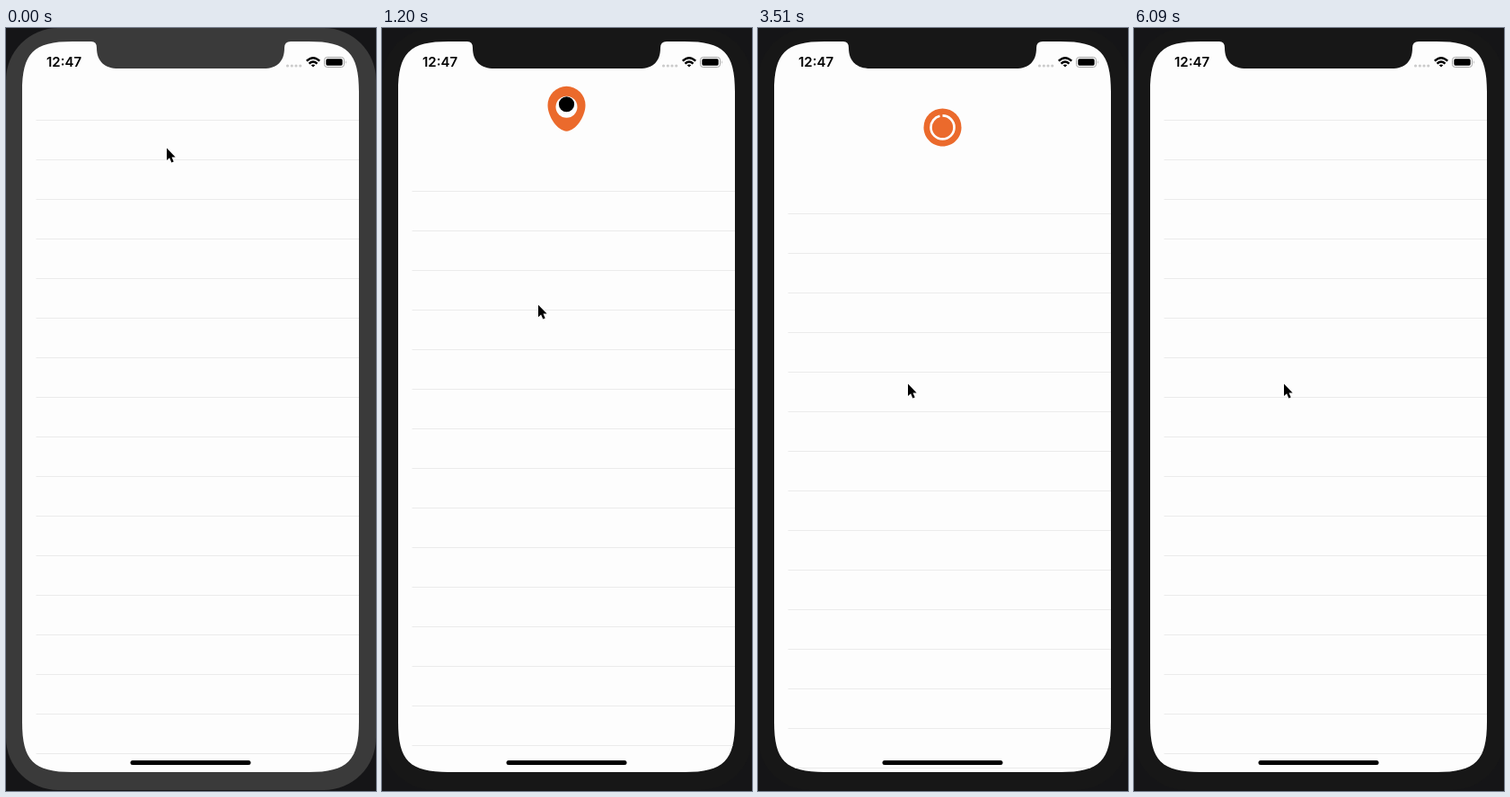
Write an HTML page that moves like this. It is 412 by 848 pixels and loops after 6330 ms.

```html
<!DOCTYPE html>
<html lang="en">
<head>
<meta charset="utf-8">
<title>Pull to refresh</title>
<style>
  html, body { margin: 0; width: 100%; height: 100%; overflow: hidden; background: #151517; }
  svg { display: block; width: 412px; height: 848px; }
  #time { font: 600 15px Inter, "Open Sans", sans-serif; }
  #bezel { fill: #171717; animation: dim 6330ms step-end infinite; }
  @keyframes dim { 0% { fill: #3a3a3a; } 0.95%, 100% { fill: #171717; } }
</style>
</head>
<body>
<svg viewBox="0 0 412 848">
  <defs>
    <clipPath id="screen">
      <path d="M74 15H95Q101 15 101 22C101 37 110 45 125 45H287C302 45 310 37 310 22Q310 15 317 15H337C380.5 15 393 27.5 393 71V771C393 814.5 380.5 827 337 827H74C30.5 827 18 814.5 18 771V71C18 27.5 30.5 15 74 15Z"/>
    </clipPath>
  </defs>
  <rect width="412" height="848" fill="#151517"/>
  <rect id="bezel" width="412" height="847" rx="58"/>

  <g clip-path="url(#screen)">
    <rect width="412" height="848" fill="#fdfdfd"/>
    <path id="lines" fill="none" stroke="#ebebeb"/>
    <g id="pin">
      <path id="drop" fill="#eb6a2c"/>
      <g id="eye">
        <circle id="white" r="12" fill="#fdfdfd"/>
        <circle id="pupil" r="8.6"/>
      </g>
      <circle id="ring" r="13" pathLength="1" transform="rotate(-90)" fill="none" stroke="#fdfdfd" stroke-width="2.7"/>
    </g>
  </g>

  <text id="time" x="45" y="43">12:47</text>
  <g fill="#cbcbcb">
    <circle cx="313.5" cy="42" r="1.6"/><circle cx="318.3" cy="42" r="1.6"/>
    <circle cx="323" cy="42" r="1.6"/><circle cx="327.7" cy="42" r="1.6"/>
  </g>
  <g fill="none" stroke="#000" stroke-width="2.4">
    <path d="M334.8 36.6Q342 29.8 349.2 36.6"/>
    <path d="M337.5 39.6Q342 35.4 346.5 39.6"/>
    <path d="M342 43.6L339.7 41.3Q342 39.6 344.3 41.3Z" fill="#000" stroke="none"/>
  </g>
  <rect x="354.5" y="32.5" width="22" height="11" rx="3" fill="none" stroke="#a4a4a4"/>
  <rect x="356.3" y="34.3" width="18.4" height="7.4" rx="1.6"/>
  <path d="M378 36Q379.6 38 378 40Z" fill="#a4a4a4"/>
  <rect x="138.5" y="814" width="134" height="5" rx="2.5"/>

  <path id="cursor" d="M0 0V13.6L3.1 10.8L5.3 15.9L7.7 14.9L5.5 9.9H9.6Z" stroke="#fdfdfd" stroke-width="1.2" paint-order="stroke"/>
</svg>
<script>
const LOOP = 6330, RELEASE = 2640, SETTLED = 2954, CLOSE = 5560, CLOSED = 5960;
const HOLD = 104, PHASE = 579, R = 21;
const $ = id => document.getElementById(id);
const clamp = v => Math.min(1, Math.max(0, v));
const mix = (a, b, k) => a + (b - a) * k;
const move = (el, x, y) => el.setAttribute("transform", `translate(${x} ${y})`);
const easeOut = k => 1 - (1 - k) ** 3;
const easeInOut = k => k * k * (3 - 2 * k);

// time, cursor x, distance dragged
const drag = [[30, 179, 0], [810, 177, 120], [1200, 174, 174], [1710, 170, 255], [2100, 167, 262]];

function cursorAt(t) {
  let i = 0;
  while (i < drag.length - 2 && t > drag[i + 1][0]) i++;
  const [t0, x0, y0] = drag[i], [t1, x1, y1] = drag[i + 1];
  let k = clamp((t - t0) / (t1 - t0));
  if (i === drag.length - 2) k = easeOut(k);
  return [mix(x0, x1, k), mix(y0, y1, k)];
}

// scroll view resistance
function rubber(y) {
  const height = 812, pull = Math.max(0, y - 14);
  return height * (1 - 1 / (0.55 * pull / height + 1));
}

function offsetAt(t, y) {
  if (t < RELEASE) return rubber(y);
  if (t < CLOSE) return mix(rubber(y), HOLD, easeOut(clamp((t - RELEASE) / (SETTLED - RELEASE))));
  return HOLD * (1 - easeInOut(clamp((t - CLOSE) / (CLOSED - CLOSE))));
}

function drawPin(t, off) {
  const k = t > RELEASE ? 1 : clamp((off - 54) / 46);
  const tip = mix(38.5, R, k), c1 = mix(14, 11.6, k), c2 = mix(8, 11.6, k);
  move($("pin"), 205.5, off + 6.4);
  $("drop").setAttribute("d",
    `M${-R} 0A${R} ${R} 0 0 1 ${R} 0C${R} ${c1} ${c2} ${tip} 0 ${tip}C${-c2} ${tip} ${-R} ${c1} ${-R} 0Z`);
  move($("white"), 0, k * 3.5);
  move($("pupil"), 0, -k * 2);
  $("eye").setAttribute("transform", `scale(${clamp((1 - k) / 0.2)})`);
}

// the arc grows clockwise to a full ring, then is eaten from its start
function drawRing(t) {
  const on = t >= SETTLED && t < CLOSE;
  const p = (t - SETTLED) / PHASE % 2;
  const start = clamp(p - 1), length = clamp(p) - start;
  const ring = $("ring");
  ring.style.display = on && length > 0.002 ? "" : "none";
  ring.setAttribute("stroke-dasharray", `${Math.max(0, length)} 2`);
  ring.setAttribute("stroke-dashoffset", -start);
}

function draw() {
  const t = performance.now() % LOOP;
  const [x, y] = cursorAt(t);
  const off = offsetAt(t, y);
  move($("cursor"), x, 133.5 + y);
  move($("lines"), 0, Math.round(off));
  drawPin(t, off);
  drawRing(t);
  requestAnimationFrame(draw);
}

$("lines").setAttribute("d", Array.from({ length: 17 }, (_, i) => `M33.5 ${102.5 + i * 44}H393`).join(""));
draw();
</script>
</body>
</html>
```
